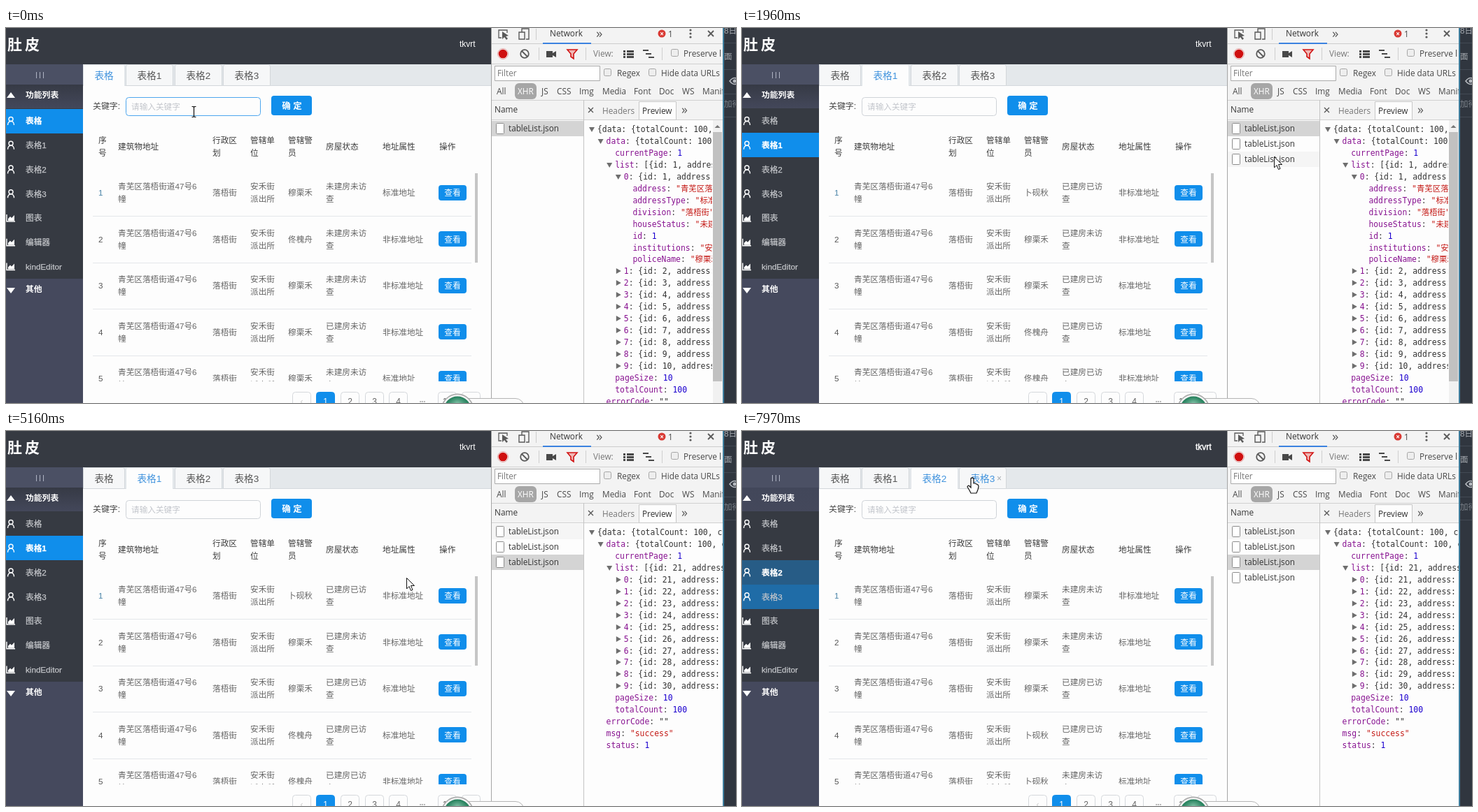
An HTML page with a canvas that plays this animation: 1043x537 px, repeating every 8 s.

```html
<!DOCTYPE html>
<html lang="zh">
<head>
<meta charset="utf-8">
<style>
html, body { margin: 0; width: 100%; height: 100%; overflow: hidden; background: #fdfdfd; }
canvas { display: block; width: 1043px; height: 537px; }
</style>
</head>
<body>
<canvas id="stage" width="1043" height="537"></canvas>
<script>
const ctx = document.getElementById('stage').getContext('2d');
const LOOP = 8000;
const UI = '"Liberation Sans", "Noto Sans CJK SC", sans-serif';
const TOOL = '"Open Sans", "Noto Sans CJK SC", sans-serif';
const MONO = '"DejaVu Sans Mono", "Noto Sans CJK SC", monospace';
const BLUE = '#108eeb', DARK = [54, 58, 66], LIT = [16, 142, 235];

// Bursts of screen updates: start, end, count
const BURSTS = [[120, 1060, 8], [1190, 1960, 7], [2360, 2630, 3], [2910, 3880, 7], [4030, 4180, 2],
  [4460, 4580, 2], [4860, 5850, 8], [6000, 6120, 2], [6420, 7400, 8], [7550, 7550, 1], [7820, 7970, 2]];

// Pointer path: time, x, y
const PATH = [[0, 268, 119], [120, 258, 111], [500, 205, 70], [1060, 212, 70], [1190, 400, 105],
  [1440, 634, 190], [1580, 634, 190], [1832, 970, 186], [1960, 760, 184], [2495, 760, 184],
  [2630, 464, 126], [2910, 549, 135], [3390, 895, 163], [3880, 895, 163], [4180, 895, 176],
  [4580, 895, 196], [4860, 895, 196], [5140, 572, 210], [5284, 560, 214], [5850, 283, 84],
  [6120, 280, 70], [6420, 280, 70], [6700, 325, 68], [7400, 327, 66], [7550, 329, 67], [8000, 329, 67]];

const CLICKS = [[520, 1], [6420, 2], [7820, 3]];
const FADE = 250;
const LOADS = [0, 920, 1700, 7115];
const POLICE = { a: '穆栗禾', b: '佟槐舟', c: '卜砚秋' };
// officer, built, visited, standard address
const TABLES = ['a001 b000 a000 a100 a001', 'c100 b101 a101 b001 a001',
  'c110 a100 a111 b111 b110', 'a000 a001 a111 c111 c001'].map(s => s.split(' '));

function text(s, x, y, size = 11.65, color = '#666', font = UI, weight = 400, align = 'left') {
  ctx.font = `${weight} ${size}px ${font}`;
  ctx.textAlign = align;
  ctx.fillStyle = color;
  ctx.fillText(s, x, y + size * 0.37);
}
function thicken(s, x, y, size, color, width) {
  ctx.lineWidth = width;
  ctx.strokeStyle = color;
  ctx.strokeText(s, x, y + size * 0.37);
}
function rect(x, y, w, h, color) {
  ctx.fillStyle = color;
  ctx.fillRect(x, y, w, h);
}
function box(x, y, w, h, r, fill, stroke) {
  ctx.beginPath();
  ctx.roundRect(x, y, w, h, r);
  if (fill) { ctx.fillStyle = fill; ctx.fill(); }
  if (stroke) { ctx.strokeStyle = stroke; ctx.lineWidth = 1; ctx.stroke(); }
}
function disc(x, y, r, fill) {
  ctx.beginPath();
  ctx.arc(x, y, r, 0, 7);
  ctx.fillStyle = fill;
  ctx.fill();
}
function ring(x, y, r, color, width = 1.5) {
  ctx.beginPath();
  ctx.arc(x, y, r, 0, 7);
  ctx.strokeStyle = color;
  ctx.lineWidth = width;
  ctx.stroke();
}
function shape(d, x, y, fill, stroke, width = 1) {
  const p = new Path2D(d);
  ctx.save();
  ctx.translate(x, y);
  if (fill) { ctx.fillStyle = fill; ctx.fill(p); }
  if (stroke) { ctx.strokeStyle = stroke; ctx.lineWidth = width; ctx.stroke(p); }
  ctx.restore();
}
function clipped(x, y, w, h, draw) {
  ctx.save();
  ctx.beginPath();
  ctx.rect(x, y, w, h);
  ctx.clip();
  draw();
  ctx.restore();
}

function snap(t) {
  let last = 0;
  for (const [start, end, n] of BURSTS)
    for (let i = 0; i < n; i++) {
      const at = n > 1 ? start + (end - start) * i / (n - 1) : start;
      if (at <= t + 0.5) last = at;
    }
  return last;
}
function pointerAt(t) {
  const i = Math.max(1, PATH.findIndex(k => k[0] > t));
  const [t0, x0, y0] = PATH[i - 1], [t1, x1, y1] = PATH[i];
  const p = (t - t0) / (t1 - t0);
  return [Math.round(x0 + (x1 - x0) * p), Math.round(y0 + (y1 - y0) * p)];
}
const countUpTo = (times, t) => times.filter(at => at <= t).length;

function sidebar(t) {
  rect(0, 0, 693, 52, '#363a42');
  rect(0, 52, 110, 485, '#45495d');
  rect(0, 52, 110, 29, '#4b5064');
  const g = ctx.createLinearGradient(0, 81, 0, 116);
  g.addColorStop(0, t < 6420 ? '#363a45' : '#42475a');
  g.addColorStop(1, '#44485b');
  rect(0, 81, 110, 35, g);
  rect(0, 115, 110, 244, '#363a42');

  const click = CLICKS.filter(c => c[0] <= t).pop() || [-FADE, 0];
  const p = Math.min(1, (t - click[0]) / FADE);
  const fading = p < 1;

  text('肚', 2, 23, 21, '#fff', UI, 900);
  text('皮', 27, 23, 21, '#fff', UI, 900);
  text('tkvrt', 648, 23, 12, '#fff');
  if (fading) thicken('tkvrt', 648, 23, 12, '#fff', 0.45);
  for (let i = 0; i < 3; i++) rect(43 + i * 5, 63, 1, 9, '#aeb3c2');
  shape('M-6 4L0-4L6 4Z', 7, 96, '#fff');
  shape('M-6-4L0 4L6-4Z', 7, 376, '#fff');
  text('功能列表', 28, 96, 11.8, '#fff', UI, 700);
  text('其他', 28, 374, 11.8, '#fff', UI, 700);

  ['表格', '表格1', '表格2', '表格3', '图表', '编辑器', 'kindEditor'].forEach((name, i) => {
    const y = 133 + i * 34.75;
    const level = i === click[1] ? p : i === click[1] - 1 ? 1 - p : 0;
    if (level > 0) {
      const c = DARK.map((d, k) => Math.round(d + (LIT[k] - d) * level));
      rect(0, Math.round(y - 17.5), 110, 35, `rgb(${c})`);
    }
    // The label colour changes only once the fade is over.
    const current = i === click[1] - (fading ? 1 : 0);
    const color = current ? '#fff' : '#c4c6ca';
    text(name, 28, y, 11.65, color, UI, current ? 700 : 400);
    thicken(name, 28, y, 11.65, color, 0.25);
    if (i < 4) {
      ring(7, y - 2.5, 3, '#fff', 1.4);
      shape('M-4.5 6C-4.5 2-2 .5 0 .5S4.5 2 4.5 6', 7, y, null, '#fff', 1.4);
    } else {
      shape('M-6-5V5H6', 7, y, null, '#fff', 1.4);
      shape('M-4 4V1L-1-2L1 0L5-4V4Z', 7, y, '#fff');
    }
  });
}

function tabs(t, px, py) {
  rect(110, 52, 583, 30, '#e4e8eb');
  rect(110, 82, 583, 1, '#d5d9dd');
  const active = countUpTo([720, 6560], t);
  let hovered = -1;
  ['表格', '表格1', '表格2', '表格3'].forEach((name, i) => {
    const x = i ? Math.round(171 + (i - 1) * 69.5) : 110;
    const w = i ? 67 : 59, on = i === active;
    if (py > 52 && py < 81 && px >= x && px <= x + w) hovered = i;
    box(x + .5, 52.5, w, 30, [3, 3, 0, 0], on ? '#fdfdfd' : '#f6f7f8', on ? '#e0e4e8' : '#d2d6da');
    if (on) rect(x + 1, 81, w - 1, 2, '#fdfdfd');
    text(name, x + 16.5, 68, 13.6, on || hovered === i ? '#3f92dd' : '#555');
    if (hovered === i && i) text('×', x + w - 13, 67.5, 12, '#a2a7ad');
  });
  return hovered;
}

function table(t) {
  const focused = t < 520;
  text('关键字:', 124, 112, 11.9, '#444');
  box(171.5, 99.5, 192, 26, 4, '#fdfdfd', focused ? '#4da6ee' : '#cfd3d8');
  text('请输入关键字', 179, 113, 11.65, '#c3c6cc');
  box(379, 97, 58, 28, 4, BLUE);
  text('确 定', 408.5, 111, 12.5, '#fff', UI, 700, 'center');

  const pair = (a, b, x, y, color) => {
    text(a, x, y - 9, 11.65, color);
    text(b, x, y + 9, 11.65, color);
  };
  const ink = '#3c3c3c';
  pair('序', '号', 132, 170, ink);
  text('建筑物地址', 160, 170, 11.65, ink);
  pair('行政区', '划', 295, 170, ink);
  pair('管辖单', '位', 349, 170, ink);
  pair('管辖警', '员', 403, 170, ink);
  text('房屋状态', 457, 170, 11.65, ink);
  text('地址属性', 538, 170, 11.65, ink);
  text('操作', 619, 170, 11.65, ink);

  const rows = TABLES[countUpTo(LOADS, t) - 1];
  clipped(110, 203, 583, 303, () => rows.forEach(([who, built, seen, std], i) => {
    const y = 236 + i * 66.5;
    if (!i && t > 5280 && t < 6420) rect(124, 204, 541, 65, '#f6f7f8');
    text(i + 1, 132, y, 11.65, i ? '#555' : '#4a84a8');
    pair('青芜区落梧街道47号6', '幢', 160, y);
    text('落梧街', 295, y);
    pair('安禾街', '派出所', 349, y);
    text(POLICE[who], 403, y);
    pair(`${+built ? '已' : '未'}建房${+seen ? '已' : '未'}访`, '查', 457, y);
    text(`${+std ? '' : '非'}标准地址`, 538, y);
    box(618, Math.floor(y) - 11, 40, 22, 4, BLUE);
    text('查看', 638, y, 11.65, '#fff', UI, 500, 'center');
    rect(124, Math.round(y + 33), 541, 1, '#e4e7ea');
  }));
  rect(670, 208, 4, 128, '#c5c5c5');

  ['‹', '1', '2', '3', '4', '', '10', '›'].forEach((s, i) => {
    const x = Math.round(408.5 + i * 34.7);
    if (!s) return text('•••', x + 13, 534, 8, '#aaa', UI, 400, 'center');
    box(x + .5, 521.5, 26, 26, 4, i === 1 ? BLUE : '#fdfdfd', i === 1 ? BLUE : '#d5d8dc');
    text(s, x + 13.5, 534.5, 12, i === 1 ? '#fff' : i ? '#666' : '#ccc', UI, 400, 'center');
  });
}

function floatingBall() {
  box(630, 530.5, 110, 30, 12, '#fbfbfb', '#b5b5b5');
  disc(645, 547, 23.5, '#a8a8a8');
  disc(645, 547, 22, '#f2f2f2');
  const g = ctx.createRadialGradient(645, 538, 2, 645, 547, 20);
  g.addColorStop(0, '#74b89c');
  g.addColorStop(1, '#1c7a55');
  disc(645, 547, 19.5, g);
}

function toolbar() {
  const ink = '#5a5a5a', label = (s, x, y, c = '#484848') => text(s, x, y, 11.8, c, TOOL);
  rect(693, 0, 332, 537, '#fdfdfd');
  rect(693, 0, 332, 103, '#f3f3f3');
  rect(693, 22, 332, 1, '#ccc');
  rect(693, 51, 332, 1, '#d0d0d0');
  rect(767, 21, 69, 2, '#3b82e0');

  shape('M5 12H1V1H13V5', 703, 2, null, ink, 1.3);
  shape('M0 0V11L3 8L6 12L8 10L5 7L9 6Z', 709, 5, ink);
  shape('M3 5V0H13V15H9M-1 5H7V15H-1Z', 734, 1, null, ink, 1.4);
  rect(757, 1, 1, 16, '#ccc');
  label('Network', 777, 8, '#333');
  text('»', 843, 7, 19, ink, TOOL);
  disc(937, 8, 5.5, '#d93a34');
  text('×', 937, 8, 10, '#fff', TOOL, 700, 'center');
  label('1', 946, 9);
  for (const y of [3, 8, 13]) disc(978, y, 1.6, ink);
  shape('M0 0L8 8M8 0L0 8', 1003, 4, null, ink, 1.8);

  ring(710, 37, 7.5, '#e6a5a5', 1);
  disc(710, 37, 6.3, '#cf0f0f');
  ring(741, 37, 5.8, ink, 1.8);
  shape('M-4-4L4 4', 741, 37, null, ink, 1.8);
  for (const x of [761, 828, 937]) rect(x, 28, 1, 18, '#cfcfcf');
  shape('M0 0H9V3L14 0V9L9 6V9H0Z', 772, 33, '#484848');
  shape('M0 0H14L9 6V13L5 10V6Z', 802, 31, '#f0b8b5', '#d11313', 1.6);
  label('View:', 839, 37, '#777');
  for (let i = 0; i < 3; i++) {
    rect(882, 32 + i * 4, 3, 3, '#484848');
    rect(887, 32 + i * 4, 10, 3, '#484848');
    rect(910 + i * 4, 31 + i * 5, 8, 2, '#484848');
  }
  const check = (x, y) => box(x - 4.5, y - 5.5, 10, 10, 2, '#eee', '#a5a5a5');
  check(955, 36);
  check(859, 64);
  check(923, 64);
  box(698.5, 54.5, 150, 21, 0, '#fff', '#aaa');
  label('Filter', 702, 65, '#777');
  label('Regex', 873, 65);
  box(727, 79, 31, 23, 6, '#a6a6a6');
  clipped(693, 0, 331, 103, () => {
    clipped(693, 24, 329, 28, () => label('Preserve log', 968, 37));
    label('Hide data URLs', 936, 65);
    [['All', 701], ['JS', 765], ['CSS', 787], ['Img', 819], ['Media', 852], ['Font', 897],
      ['Doc', 933], ['WS', 966], ['Manifest', 995]].forEach(([s, x]) => label(s, x, 91));
    label('XHR', 731, 91, '#fff');
  });
}

function requests(t) {
  rect(693, 103, 332, 28, '#f3f3f3');
  rect(693, 103, 332, 1, '#d0d0d0');
  rect(693, 131, 332, 1, '#d0d0d0');
  text('Name', 698, 117, 11.8, '#333', TOOL);
  const selected = t < 2360 ? 0 : 2, keyboardFocus = t >= 2360 && t < 3550;
  for (let i = 0; i < countUpTo(LOADS, t); i++) {
    const y = 144 + i * 22, blue = i === selected && keyboardFocus;
    rect(694, y - 11, 131, 22, blue ? '#3879d9' : i === selected ? '#d4d4d4' : i % 2 ? '#fdfdfd' : '#f5f5f5');
    box(700.5, y - 7.5, 11, 15, 1, '#fff', blue ? '#cfe0fa' : '#8c8c8c');
    text('tableList.json', 718, y, 11.7, blue ? '#fff' : '#333', TOOL);
  }
  rect(825, 103, 1, 434, '#c4c4c4');
  rect(693, 0, 1, 537, '#a5a5a5');
  shape('M0 0L7 7M7 0L0 7', 832, 114, null, '#555', 1.3);
  text('Headers', 852, 119, 11.8, '#777', TOOL);
  box(904.5, 105.5, 53, 26, 0, '#fdfdfd', '#c8c8c8');
  text('Preview', 909, 119, 11.8, '#333', TOOL);
  text('»', 965, 116, 18, '#5a5a5a', TOOL);
}

// Lines are [depth, key, value, arrow]; arrow is 'open', 'shut' or none.
function previewLines(t) {
  const full = t < 2490, first = full ? 1 : 21, lines = [];
  const add = (...line) => lines.push(line);
  const dataOpen = full || t >= 3550, listOpen = full || t >= 4860;
  add(0, '', '{data: {totalCount: 100, currentPage: 1}}', 'open');
  add(1, 'data', '{totalCount: 100, currentPage: 1}', dataOpen ? 'open' : 'shut');
  if (dataOpen) {
    add(2, 'currentPage', 1);
    add(2, 'list', `[{id: ${first}, address: "", }]`, listOpen ? 'open' : 'shut');
    for (let i = 0; listOpen && i < 10; i++) {
      add(3, String(i), `{id: ${first + i}, address: ""}`, full && !i ? 'open' : 'shut');
      if (full && !i) {
        add(4, 'address', '"青芜区落梧街道"');
        add(4, 'addressType', '"标准地址"');
        add(4, 'division', '"落梧街"');
        add(4, 'houseStatus', '"未建房"');
        add(4, 'id', 1);
        add(4, 'institutions', '"安禾街"');
        add(4, 'policeName', `"${POLICE.a}"`);
      }
    }
    add(2, 'pageSize', 10);
    add(2, 'totalCount', 100);
  }
  add(1, 'errorCode', '""');
  add(1, 'msg', '"success"');
  add(1, 'status', 1);
  return lines;
}

function preview(t) {
  const scrolls = t < 2490;
  clipped(826, 132, scrolls ? 183 : 198, 405, () => previewLines(t).forEach(([depth, key, value, arrow], i) => {
    const x = 845 + depth * 12.6, y = Math.round(145 + i * 16.95);
    if (arrow) shape(arrow === 'open' ? 'M-4-3H4L0 4Z' : 'M-3-4V4L4 0Z', x - 8, y, '#6e6e6e');
    const color = arrow ? '#333' : typeof value === 'number' ? '#1c00cf' : '#c41a16';
    let at = x;
    if (key) {
      text(key, x, y, 11.4, '#881391', MONO);
      at += ctx.measureText(key).width;
      text(': ', at, y, 11.4, '#444', MONO);
      at += ctx.measureText(': ').width;
    }
    text(value, at, y, 11.4, value === '""' ? '#333' : color, MONO);
  }));
  if (scrolls) {
    rect(1010, 132, 14, 405, '#f1f1f1');
    rect(1010, 149, 13, 357, '#c1c1c1');
    shape('M-4 2L0-2L4 2Z', 1016.5, 141, '#777');
  }
}

function edge() {
  rect(1025, 0, 18, 537, '#30363f');
  rect(1024, 0, 2, 537, '#3f7f9f');
  for (const y of [21, 59, 94, 127]) rect(1026, y, 17, 1, '#434a54');
  text('8日', 1026, 4, 11.5, '#a9adb3');
  text('面', 1026, 41, 11.5, '#a9adb3');
  text('加待', 1026, 109, 11.5, '#7d838b');
  shape('M0 0Q7-9 14 0Q7 9 0 0Z', 1034, 76, null, '#b5b9bf', 1.6);
  disc(1041, 76, 2.5, '#b5b9bf');
}

function pointer(x, y, hovered) {
  if (x > 172 && x < 364 && y > 99 && y < 126)
    shape('M-3-7H-1L0-6L1-7H3M0-6V7M-3 8H-1L0 7L1 8H3', x + .5, y + .5, null, '#111', 1.2);
  else if (hovered >= 0)
    shape('M-2 1Q0-1 2 1V8L4 8L6 9L8 10Q9 11 9 13L8 17L6 22H-2L-4 18L-7 13Q-6 10-4 12L-2 14Z', x, y, '#fff', '#111', 1.2);
  else
    shape('M.5.5V16L4 12.5L6.5 18.5L9 17.5L6.5 11.5H11.5Z', x, y, '#fff', '#111', 1);
}

function draw(now) {
  const t = snap(now % LOOP), [px, py] = pointerAt(t);
  rect(0, 0, 1043, 537, '#fdfdfd');
  sidebar(t);
  const hovered = tabs(t, px, py);
  table(t);
  toolbar();
  requests(t);
  preview(t);
  floatingBall();
  edge();
  pointer(px, py, hovered);
}

const begin = performance.now();
(function tick() {
  draw(performance.now() - begin);
  requestAnimationFrame(tick);
})();
</script>
</body>
</html>
```
